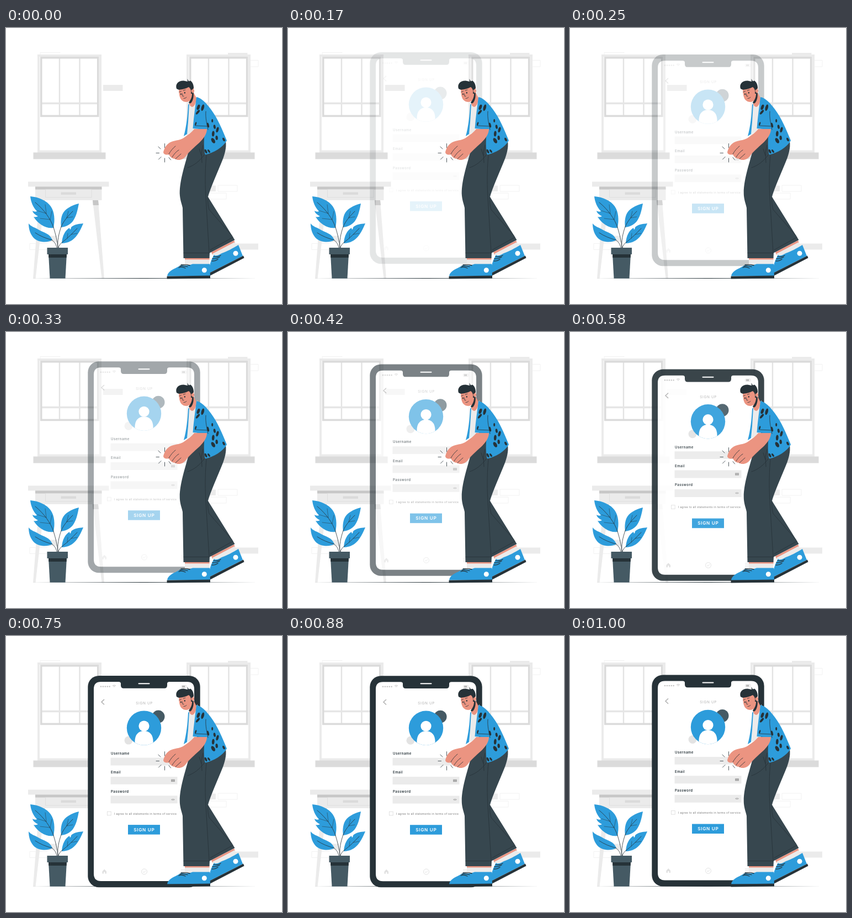
Animation of 500x500 px, one loop 1.04 s. Source, as an HTML page:

```html
<!DOCTYPE html>
<html lang="en">
<head>
<meta charset="utf-8">
<title>Sign up</title>
<style>
  html, body { margin: 0; width: 100%; height: 100%; overflow: hidden; background: #fff; }
  svg { display: block; width: 100vw; height: 100vh; }
  text { font-family: Inter, "Open Sans", sans-serif; }
  .blue { fill: #2d9cdb; }
  .dark { fill: #263238; }
  .skin { fill: #eb9481; }
  .pale { fill: #ebebeb; }
  .grey { fill: #dbdbdb; }
  .ink { fill: none; stroke: #263238; stroke-width: .8; stroke-linecap: round; stroke-linejoin: round; }
  .fine { stroke-width: .5; }
  .bold { stroke-width: 1.3; }
  .brick { fill: none; stroke: #efefef; stroke-width: .8; }
  .icon { fill: none; stroke: #dedede; stroke-width: .9; }
  .label { font-size: 6.1px; font-weight: 600; letter-spacing: .45px; fill: #263238; }
</style>
</head>
<body>
<svg viewBox="0 0 500 500">
  <defs>
    <g id="window">
      <rect x="59" y="50" width="112" height="174" fill="#fff" stroke="#ebebeb" stroke-width="4"/>
      <path d="M97 54V159M133.500 54V159" stroke="#e3e3e3" stroke-width="2.400"/>
      <path d="M64 136.500H167" stroke="#e6e6e6" stroke-width="3.600"/>
      <rect x="63.700" y="53.800" width="103" height="105.600" fill="none" stroke="#dbdbdb" stroke-width="3.600"/>
      <rect class="pale" x="57" y="221.500" width="116" height="4.500"/>
      <rect class="grey" x="49.500" y="225.500" width="131" height="12"/>
    </g>
    <clipPath id="disc"><circle cx="250" cy="165" r="31.200"/></clipPath>
  </defs>

  <g id="room">
    <path class="brick" d="M62 48V44.500H98V46M443 58.500H457V70H443M384 285H419V296H384ZM364 299H399V310H364ZM75 390.500H43V401.500H75"/>
    <path class="pale" d="M176 103H211.500V114H176ZM402 45H437.500V48.500H402ZM345 285.500H380V296H345ZM410 390.500H457V401.500H410ZM60 376.500H92V387.500H60Z"/>
    <use href="#window"/>
    <use href="#window" x="270"/>
    <path class="pale" d="M60 312H70L53.500 454H49ZM157 312H167L178 454H173.500Z"/>
    <path fill="#c7c7c7" d="M60 312H70L69 321H59ZM157 312H167L168 321H157.700Z"/>
    <rect class="pale" x="53" y="290" width="120.500" height="22"/>
    <rect fill="#c7c7c7" x="53" y="287" width="120.500" height="5.500"/>
    <rect class="pale" x="40" y="278.400" width="146.500" height="9"/>
    <path d="M71.500 292.500V307H155V292.500" fill="#ebebeb" stroke="#dbdbdb" stroke-width=".8"/>
    <rect class="grey" x="99.500" y="297.500" width="27.500" height="4.500"/>
    <path class="dark" d="M45 453.500L250 453L455 453.500L250 454Z"/>
  </g>

  <g id="plant">
    <g class="blue">
      <path d="M44 305C59 306 74 313 81 323C88 333 89 348 86 362C72 364 58 355 50 342C53 343 56 342 58 341C53 338 49 336 48 331C51 333 54 333 56 332C49 325 45 315 44 305Z"/>
      <path d="M132 318C119 321 106 328 102 338C99 346 99 354 100 361C109 360 118 356 123 347C128 339 130 328 132 318Z"/>
      <path d="M41 354C45 360 52 361 60 366C69 371 79 372 84 384C77 389 61 389 52 382C44 375 41 364 41 354Z"/>
      <path d="M140 354C131 355 123 356 118 361C117 366 116 366 115 362C107 367 102 376 101 390C112 390 122 385 129 375C134 368 137 361 140 354Z"/>
    </g>
    <path class="ink" d="M86 361C90 374 93 386 94 398M100 360C95 374 93 386 94 398M83 384C89 388 91 393 92 398M102 388C98 391 96 394 95 398"/>
    <path class="ink" d="M53 316C69 329 81 346 86 361M121 332C112 341 104 350 100 360M53 371C62 377 72 381 83 384M129 363C121 371 112 381 102 388"/>
    <path class="ink fine" d="M73 336L71 320M80 347L83 332M73 336L57 331M80 347L62 345M110 344L121 342M110 344L113 332M118 374L129 372M111 381L112 372"/>
    <path fill="#455a64" d="M77 409H110L107.500 453.700H79.500Z"/>
    <path class="dark" d="M77 409H110L109.600 416H77.400Z"/>
    <rect fill="#455a64" x="74.500" y="398" width="37.500" height="12"/>
  </g>

  <g id="phone">
    <rect class="dark" x="148.300" y="70.400" width="203.400" height="383.200" rx="20"/>
    <path fill="#fff" d="M172 81.500H204C207 81.500 208 83 208 85V88C208 91.500 210 93.200 213 93.200H287C290 93.200 292 91.500 292 88V85C292 83 293 81.500 296 81.500H328Q341 81.500 341 94.500V429Q341 442.500 328 442.500H172Q159 442.500 159 429V94.500Q159 81.500 172 81.500Z"/>
    <path d="M240.500 84.600H259.500" stroke="#fff" stroke-width="2" stroke-linecap="round"/>
    <path d="M172 90H188" stroke="#c4c4c4" stroke-width="2.600" stroke-linecap="round" stroke-dasharray="0 3.900"/>
    <path d="M193 88.500Q196 86.300 199 88.500M194.500 90.200Q196 89 197.500 90.200M195.900 91.800H196.100" fill="none" stroke="#c4c4c4"/>
    <rect x="317.700" y="87.800" width="9.300" height="4.400" rx="1" class="icon"/>
    <path d="M319 90H324.500" stroke="#b5b5b5" stroke-width="3"/>
    <path d="M178 113.300L173 118L178 122.700" fill="none" stroke="#b0b0b0" stroke-width="1.500"/>
    <text x="250.700" y="122.300" text-anchor="middle" font-size="6.400" letter-spacing=".7" fill="#b3b3b3">SIGN UP</text>
    <circle cx="276" cy="144.500" r="11.500" fill="#455a64"/>
    <circle cx="222" cy="187.500" r="7.500" fill="#e3e3e3"/>
    <circle class="blue" cx="250" cy="165" r="31.200"/>
    <g fill="#fff">
      <circle cx="250" cy="161.500" r="9.600"/>
      <path clip-path="url(#disc)" d="M233.400 198V190C233.400 177 240 170.500 250 170.500S266.600 177 266.600 190V198Z"/>
    </g>
    <path class="pale" d="M189.500 219H310.500V232.800H189.500ZM189.500 253.300H310.500V267.200H189.500ZM189.500 287.700H310.500V301.700H189.500Z"/>
    <text class="label" x="190" y="213.300">Username</text>
    <text class="label" x="190" y="247.600">Email</text>
    <text class="label" x="190" y="282.200">Password</text>
    <rect x="299" y="258" width="7" height="4.500" fill="#a6a6a6"/>
    <path d="M299.500 258.500L302.500 260.500L305.500 258.500" fill="none" stroke="#c8c8c8" stroke-width=".5"/>
    <path d="M299 294.600Q302.500 291.500 306 294.600Q302.500 297.700 299 294.600Z" fill="#b0b0b0"/>
    <circle cx="302.500" cy="294.600" r=".8" fill="#ebebeb"/>
    <rect x="183.500" y="316.500" width="6.700" height="6.700" class="icon"/>
    <text x="196" y="322" font-size="5.200" letter-spacing=".17" fill="#7d7d7d">I agree to all statements in terms of service</text>
    <rect class="blue" x="221" y="340.500" width="58" height="17.500"/>
    <text x="250.400" y="352.200" text-anchor="middle" font-size="8.200" font-weight="600" letter-spacing=".7" fill="#fff">SIGN UP</text>
    <path fill="#e0e0e0" d="M174.500 425L178.200 421L182 425V429H179.500V426H177V429H174.500Z"/>
    <circle cx="250.500" cy="425.300" r="5" class="icon"/>
    <path class="icon" d="M248 425.200L250 427L253 423.500M317 422H324M317 425H324M317 428H324"/>
  </g>

  <g id="man">
    <g id="backFoot">
      <path class="skin" d="M372 406L413 385L415 389L374 411Z"/>
      <path class="pale" d="M374 409L414 388L419 396L378 418Z"/>
      <path class="blue" d="M377 411C380 414 386 411 391 408C400 405 411 399 421 393L429 413L368 444C367 431 372 419 377 411Z"/>
      <path class="dark" d="M368 444L430 412.500L431.500 416.500L369 449Z"/>
      <circle cx="416" cy="408.300" r="4.500" fill="#fff"/>
      <path class="ink bold" d="M376 414Q382 416 389 412M374 418Q380 419 387 415M373 422Q378 423 384 419"/>
    </g>
    <g id="frontFoot">
      <rect class="skin" x="324" y="415" width="44.500" height="5"/>
      <rect class="pale" x="324" y="419.500" width="44.500" height="9"/>
      <path class="blue" d="M318 429C324 431 333 430 338 427.500H369L370 449.500H292C293 441 303 437 309 434Z"/>
      <path class="dark" d="M291.500 449.800L370 448.500V453.600L291.500 454.500Z"/>
      <circle cx="359.300" cy="438.700" r="4.500" fill="#fff"/>
      <path class="ink bold" d="M317 429Q325 428 333 430M315 431.500Q322 430 329 432.500M313 434Q319 432 325 435"/>
    </g>
    <path fill="#37474f" d="M330 226C324 248 313 281 315 304C316 314 319 320 320 326L321.500 417H368.500L369 407.500L414.500 384L366 306C370 291 382 264 389 247C396 231 400 217 398 205L364 190L346 208Z"/>
    <path class="ink" d="M363 231C360 262 361 290 362 306L368 407M366 307C365 312 366 322 368 329L410 377M322 407.500H368M370 402L411 379M359 230C351 241 341 249 329 253M357 212L354 226L355 244M350 219L354 231"/>

    <path class="pale" d="M331 138L347 124L346 184L329 192Z"/>
    <path class="blue" d="M332 137L330 170L328 192L322 196C327 178 329 158 330 139Z"/>
    <path class="skin" d="M332 132L340 117L345 127C345 134 342 141 338 143C334 143 331 139 332 132Z"/>
    <path class="blue" d="M345 125C354 127 362 135 371 147C383 163 392 184 400 204C392 217 377 226 361 229.500C358 221 358 198 361 184L338.500 182C340 161 343 142 345 125Z"/>
    <path class="ink" d="M362 151C361 163 364 174 366 184M343 177L366 178"/>
    <g id="spots" class="dark"></g>

    <path class="ink" d="M287.500 209.500V217M276 215L280 219M272 226.500H277.500M276.500 238L281 233.500M287.500 236V243M295 234.500L298.500 239M298 215L294 219"/>
    <path class="skin" d="M341 183H364C364 192 358 200 350 208C340 217 331 225 326 232C321 239 312 241 306 237C301 237 297 233 295 229C291 230 286 230 285 225C287 216 292 209 300 206C308 203 317 203 322 199C330 194 337 188 341 183Z"/>
    <path class="ink" d="M295 228.500C298 223 302 218 307 214M301 234C304 229 308 224 313 221M307 237L317 228"/>

    <path class="skin" d="M313 108C313 118 314 126 318 130.500C323 135.500 331 135 334 130L340 121V106L320 102Z"/>
    <path class="dark" d="M339.500 117C340.500 124 339 131 335.500 135.500C334 137 332 137 331 135C335 130 337.500 124 337 118Z"/>
    <path class="dark" d="M309 110C306 101 313 95 322 95.500L329 97L328.500 92L331 96.500L334 95.500C338 98 340 103 340 109L338 111L337 119L335 119C336 113 334 109 331 107C326 109.500 317 112.500 312 111.500Z"/>
    <circle class="skin" cx="338.300" cy="114" r="2.800"/>
    <path class="ink" d="M314 116L317.500 114.500M321 113.300L325 112M319.500 119L320 123.500L322 123.500M322 127.500Q325 128 327 125.500"/>
    <ellipse class="dark" cx="317" cy="119.700" rx="1" ry="1.500"/>
    <ellipse class="dark" cx="323.800" cy="117.200" rx="1" ry="1.500"/>
  </g>
</svg>
<script>
  const SVG = "http://www.w3.org/2000/svg";
  // x, y, half width, half height, tilt
  const spots = [
    [348.5, 143.5, 2.5, 5, 20], [356.3, 144.3, 2.5, 6, 15], [347.5, 152.5, 2, 5, 40],
    [366, 176, 1.8, 4.5, -15], [373.7, 168, 1.5, 3, 0], [377.8, 179, 2, 3.8, -10],
    [383, 184.3, 2.2, 5, 15], [375.3, 191.5, 2.3, 5, 5], [375.3, 204, 3, 5.3, -30],
    [381.7, 199, 2.2, 4, -5], [394.5, 202, 2, 3.5, -25], [362, 223.5, 2, 4, -25],
    [367.5, 223, 1.6, 3.5, -35], [343.7, 173.5, 1.3, 3.3, 15]
  ];
  for (const [x, y, rx, ry, tilt] of spots) {
    const spot = document.createElementNS(SVG, "ellipse");
    spot.setAttribute("rx", rx);
    spot.setAttribute("ry", ry);
    spot.setAttribute("transform", `translate(${x} ${y}) rotate(${tilt})`);
    document.getElementById("spots").append(spot);
  }

  const LOOP = 1040, STEP = 1000 / 24, LEAD = 15, DROP = 30;
  const phone = document.getElementById("phone");

  const curve = (s, a, b) => 3 * (1 - s) ** 2 * s * a + 3 * (1 - s) * s * s * b + s ** 3;

  // cubic-bezier(.36, -.01, .5, 1.38), solved by bisection
  function ease(x) {
    let lo = 0, hi = 1;
    for (let i = 0; i < 24; i++) {
      const mid = (lo + hi) / 2;
      if (curve(mid, .36, .5) < x) lo = mid; else hi = mid;
    }
    return curve(lo, -.01, 1.38);
  }

  function draw(now) {
    const step = Math.min(24, Math.floor((now % LOOP + 6) / STEP));
    const p = step ? ease(Math.min(1, (step * STEP + LEAD) / 1000)) : 0;
    phone.setAttribute("transform", `translate(0 ${DROP * (p - 1)})`);
    phone.setAttribute("opacity", Math.max(0, Math.min(1, p)));
  }

  const start = performance.now();
  function tick() {
    draw(performance.now() - start);
    requestAnimationFrame(tick);
  }
  tick();
</script>
</body>
</html>
```
